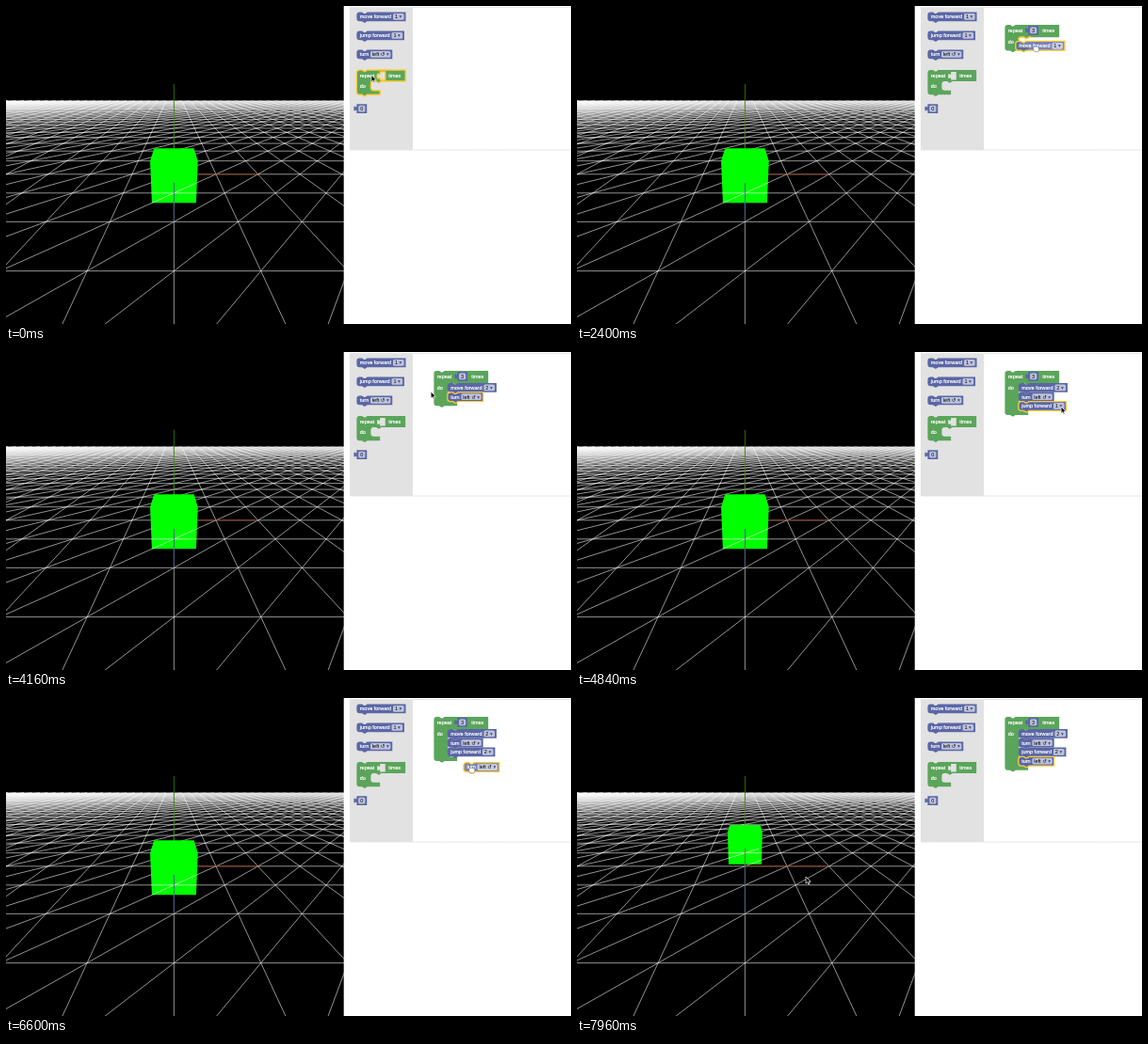
An HTML page for the animation above (8000 ms loop, 600x338 px).

```html
<!DOCTYPE html>
<html lang="en">
<head>
<meta charset="utf-8">
<title>Block-programmed cube</title>
<style>
  html, body { margin: 0; width: 100%; height: 100%; overflow: hidden; background: #fff; }
  svg { display: block; width: 100vw; height: 100vh; }
  text { font-family: "Liberation Sans", "DejaVu Sans", sans-serif; font-size: 14.67px; fill: #fff; }
  .block > text { stroke: #fff; stroke-width: .5; }
  .field rect { fill: #fff; fill-opacity: .6; }
  .field text { fill: #414b80; }
  .field .value { fill: #000; }
  .math > path { fill: #5b67a5; }
  .loop > path { fill: #5ba55b; }
  .on > path { stroke: #fc3; stroke-width: 3.4; }
  .held > path { fill-opacity: .8; }
  .menu text { font-size: 13px; fill: #000; }
  #floor path { fill: none; stroke-width: .9; }
  .grid { stroke: #fff; stroke-opacity: .64; }
</style>
</head>
<body>
<svg id="stage" viewBox="0 0 600 338" preserveAspectRatio="none"></svg>
<script>
const LOOP = 8000, UNIT = .375, ROW = 26;
const stage = document.getElementById('stage');

function add(parent, tag, attrs = {}, text) {
  const el = document.createElementNS('http://www.w3.org/2000/svg', tag);
  for (const k in attrs) el.setAttribute(k, attrs[k]);
  if (text !== undefined) el.textContent = text;
  parent.appendChild(el);
  return el;
}
const show = (el, on) => el.setAttribute('visibility', on ? 'visible' : 'hidden');
const plus = (a, b) => [a[0] + b[0], a[1] + b[1]];

// ---- 3D view: camera at (0, 2, 5) looking at the origin ----
const DIST = Math.hypot(2, 5), SIN = 2 / DIST, COS = 5 / DIST, FOCAL = 240;
const CENTER = [178.4, 178.8];

function project(x, y, z) {
  const s = FOCAL / (DIST - z * COS - y * SIN);
  return plus(CENTER, [x * s, (z * SIN - y * COS) * s]);
}
const segment = (a, b) => `M${project(...a)}L${project(...b)}`;

function buildFloor() {
  const floor = add(stage, 'g', { id: 'floor' });
  const N = 25, near = 4.9;
  let rows = '', cols = '', diagonals = '';
  for (let i = -N; i <= N; i++) {
    if (i < near) rows += segment([-N, 0, i], [N, 0, i]);
    cols += segment([i, 0, -N], [i, 0, near]);
  }
  for (let c = 1 - 2 * N; c < N + near; c++) {
    const far = Math.max(-N, c - N), close = Math.min(near, c + N);
    diagonals += segment([c - far, 0, far], [c - close, 0, close]);
  }
  for (const d of [rows, cols, diagonals]) add(floor, 'path', { d, class: 'grid' });
  const axis = (end, stroke) => add(floor, 'path', { d: segment([0, 0, 0], end), stroke });
  axis([2, 0, 0], '#82330f');
  axis([0, 2, 0], '#2f7a00');
  axis([0, 0, 2], '#3a5080');
}

add(stage, 'rect', { width: 359, height: 338, fill: '#000' });
buildFloor();
const cube = add(stage, 'polygon', { fill: '#0f0' });
// the floor cuts the cube in half, so it shows again over the lower front face
const front = add(add(stage, 'clipPath', { id: 'front' }), 'polygon');
add(stage, 'use', { href: '#floor', 'clip-path': 'url(#front)' });

function moveCube(z) {
  const f = z + .5, b = z - .5;
  const points = list => list.map(p => project(...p)).join(' ');
  cube.setAttribute('points', points(
    [[-.5, -.5, f], [-.5, .5, f], [-.5, .5, b], [.5, .5, b], [.5, .5, f], [.5, -.5, f]]));
  front.setAttribute('points', points([[-.5, 0, f], [.5, 0, f], [.5, -.5, f], [-.5, -.5, f]]));
}

// ---- blocks, drawn in editor units and scaled down ----
const NOTCH = 'l6 4 3 0 6 -4', NOTCH_BACK = 'l-6 4 -3 0 -6 -4';

function place(g, [x, y]) {
  g.setAttribute('transform', `translate(${x.toFixed(2)} ${y.toFixed(2)}) scale(${UNIT})`);
}

function field(g, x, w, value, arrow) {
  const f = add(g, 'g', { class: 'field' });
  add(f, 'rect', { x, y: 4, width: w, height: 18, rx: 4 });
  const t = add(f, 'text', { x: x + 5, y: 18 });
  g.value = add(t, 'tspan', { class: 'value' }, value);
  if (arrow) add(t, 'tspan', {}, ' ▾');
}

function command(label, w, fieldWidth, value) {
  const g = add(stage, 'g', { class: 'block math' });
  add(g, 'path', { d: `M0 8a8 8 0 0 1 8 -8H15${NOTCH}H${w}v${ROW}H30${NOTCH_BACK}H8a8 8 0 0 1 -8 -8z` });
  add(g, 'text', { x: 9, y: 18 }, label);
  field(g, w - fieldWidth - 5, fieldWidth, value, true);
  return g;
}
const move = () => command('move forward', 139, 31, '1');
const jump = () => command('jump forward', 135, 31, '1');
const turn = () => command('turn', 101, 57, 'left ↺');

function number() {
  const g = add(stage, 'g', { class: 'block math' });
  add(g, 'path', { d: `M0 0H29v${ROW}H0V20c0 -10 -8 8 -8 -7.5s8 2.5 8 -7.5z` });
  field(g, 5, 19, '0', false);
  return g;
}

function repeat() {
  const g = add(stage, 'g', { class: 'block loop' });
  g.shape = add(g, 'path', { 'fill-rule': 'evenodd' });
  add(g, 'text', { x: 9, y: 21 }, 'repeat');
  g.times = add(g, 'text', { y: 21 }, 'times');
  g.body = add(g, 'text', { x: 9 }, 'do');
  shapeRepeat(g, false, 0);
  return g;
}

function shapeRepeat(g, filled, count) {
  const w = filled ? 154 : 138, top = filled ? 35 : 32;
  const mouth = Math.max(1, count) * ROW - 16;
  const socket = filled ? '' : 'M66 5v5c0 10 -8 -8 -8 7.5s8 -2.5 8 7.5v3h15v-23z';
  g.shape.setAttribute('d', `M0 8a8 8 0 0 1 8 -8H15${NOTCH}H${w}v${top}H70${NOTCH_BACK}H48` +
    `a8 8 0 0 0 -8 8v${mouth}a8 8 0 0 0 8 8H66v12H30${NOTCH_BACK}H8a8 8 0 0 1 -8 -8z${socket}`);
  g.times.setAttribute('x', w - 48);
  g.body.setAttribute('y', top + 18);
}

// ---- editor ----
add(stage, 'rect', { x: 358.7, width: 242, height: 338, fill: '#fff' });
add(stage, 'rect', { x: 365.5, y: 1.5, width: 260, height: 151.5, fill: 'none',
  stroke: '#d4d4d4', 'stroke-width': .8, 'stroke-dasharray': '1.2 .6' });
add(stage, 'rect', { x: 365, y: 2, width: 67, height: 151, fill: '#e2e2e2' });

const TOOL = { move: 6.4, jump: 26.4, turn: 46.6, repeat: 68, number: 104.3 };
const make = { move, jump, turn, repeat, number };
const toolAt = kind => [372.4, TOOL[kind]];
for (const kind in TOOL) place(make[kind](), toolAt(kind));

const slot = i => [468.8, 33.1 + i * ROW * UNIT];

// ---- motion ----
function track(keys, t) {
  const i = keys.findIndex(k => t < k.t);
  if (i < 0) return keys[keys.length - 1].p;
  if (i === 0) return keys[0].p;
  const a = keys[i - 1], b = keys[i], u = (t - a.t) / (b.t - a.t), e = u * u * (3 - 2 * u);
  return a.p.map((v, k) => v + (b.p[k] - v) * e);
}

const stops = [], drags = [], picks = [];
const glide = (t, p) => stops.push({ t, p });
const rest = t => glide(t, stops[stops.length - 1].p);

// a block is grabbed in the toolbox, carried close to its home, then snaps in
function drag(kind, home, grabX, start, end, aim = [3, 2], drop = end + 40) {
  const grab = [grabX, 5.4];
  const keys = [{ t: start, p: toolAt(kind) }, { t: end, p: plus(home, aim) },
    { t: drop, p: plus(home, aim.map(v => v / 4)) }];
  glide(start - 40, plus(keys[0].p, grab));
  for (const k of keys) glide(k.t, plus(k.p, grab));
  const d = { el: make[kind](), keys, home, start, drop, off: LOOP };
  if (drags.length) drags[drags.length - 1].off = start + 40;
  drags.push(d);
  return d;
}

// the second entry is chosen in the block's dropdown
function pick(d, open, close) {
  const at = plus(d.home, [27.3, 9.6]), chosen = Math.min(open + 360, close - 80);
  glide(open - 80, plus(d.home, [45.3, 5.4]));
  rest(chosen - 160);
  glide(chosen, plus(at, [18, 11]));
  rest(close + 200);
  picks.push({ d, at, open, close });
}

const loop = drag('repeat', [454.4, 20], 15.6, 40, 360);
const count = drag('number', [479.25, 21.1], 6, 560, 760);
rest(1320);
const walk = drag('move', slot(0), 21.5, 2040, 2400, [-3, 4.3]);
pick(walk, 2640, 2880);
const turn1 = drag('turn', slot(1), 22.6, 3360, 3680);
rest(4040);
const leap = drag('jump', slot(2), 17, 4360, 4640);
pick(leap, 4920, 5960);
const turn2 = drag('turn', slot(3), 8.5, 6400, 6600, [17.2, 6.3], 6800);
rest(7200);
glide(7440, [400, -12]);
rest(7520);
glide(7920, [243, 190]);

const body = [walk, turn1, leap, turn2];
const hint = add(stage, 'path', { d: `M0 8a8 8 0 0 1 8 -8H15${NOTCH}h5`,
  fill: 'none', stroke: '#fc3', 'stroke-width': 4 });
const caret = add(stage, 'rect', { x: 484, y: 24, width: .7, height: 5.5, fill: '#000' });

const ITEM = 8.25;
const menu = add(stage, 'g', { class: 'menu' });
add(menu, 'rect', { x: .5, y: .5, width: 48, height: 68, fill: '#fff', stroke: '#ccc', 'stroke-width': .6 });
const hover = add(menu, 'rect', { x: 1, width: 47, height: ITEM, fill: '#d6e9f8' });
const list = add(menu, 'g', { transform: `scale(${UNIT})` });
const lineY = i => (1.5 + ITEM * (i + .72)) / UNIT;
for (let i = 0; i < 8; i++) add(list, 'text', { x: 28, y: lineY(i) }, i + 1);
add(list, 'text', { x: 9, y: lineY(0) }, '✓');

const arrow = add(stage, 'path', { d: 'M0 0V7.2L1.7 5.7 2.8 8.2 4 7.7 2.9 5.3H5.2z',
  fill: '#000', stroke: '#fff', 'stroke-width': .7 });
const hand = add(stage, 'path', { d: 'M-2.6 1.2q.8 -1.4 1.6 -.4 .9 -1 1.7 0 1 -.8 1.6 .2 1.1 -.2 1 1.2v1.6l-.9 2h-3.6l-1.8 -2.4z',
  fill: '#fff', stroke: '#333', 'stroke-width': .4 });

function render(t) {
  const within = (a, b) => t >= a && t < b;

  let target = null, holding = false;
  for (const d of drags) {
    const held = t > d.start && t < d.drop;
    const at = t >= d.drop ? d.home : track(d.keys, t);
    holding = holding || held;
    if (held && body.includes(d) && Math.hypot(at[0] - d.home[0], at[1] - d.home[1]) < 12) target = d;
    show(d.el, t >= d.start - 40);
    d.el.classList.toggle('on', within(d.start - 40, d.off));
    d.el.classList.toggle('held', held);
    place(d.el, at);
  }
  show(hint, target);
  if (target) place(hint, target.home);
  shapeRepeat(loop.el, t >= count.drop, body.filter(d => t >= d.drop).length);

  count.el.value.textContent = t < 1320 ? '0' : '3';
  show(caret, within(880, 1080));

  const cursor = track(stops, t), hidden = within(860, 1320);
  for (const el of [arrow, hand]) el.setAttribute('transform', `translate(${cursor})`);
  show(arrow, !hidden && !holding);
  show(hand, !hidden && holding);

  for (const p of picks) p.d.el.value.textContent = t < p.close ? '1' : '2';
  const open = picks.find(p => within(p.open, p.close));
  const over = open ? Math.floor((cursor[1] - open.at[1] - 1.5) / ITEM) : -1;
  show(menu, open);
  show(hover, over >= 0);
  if (open) menu.setAttribute('transform', `translate(${open.at})`);
  if (over >= 0) hover.setAttribute('y', 1.5 + over * ITEM);

  moveCube(-2 * Math.min(1, Math.max(0, (t - 7480) / 505)));
}

const begin = performance.now();
function tick() {
  render((performance.now() - begin) % LOOP);
  requestAnimationFrame(tick);
}
tick();
</script>
</body>
</html>
```
